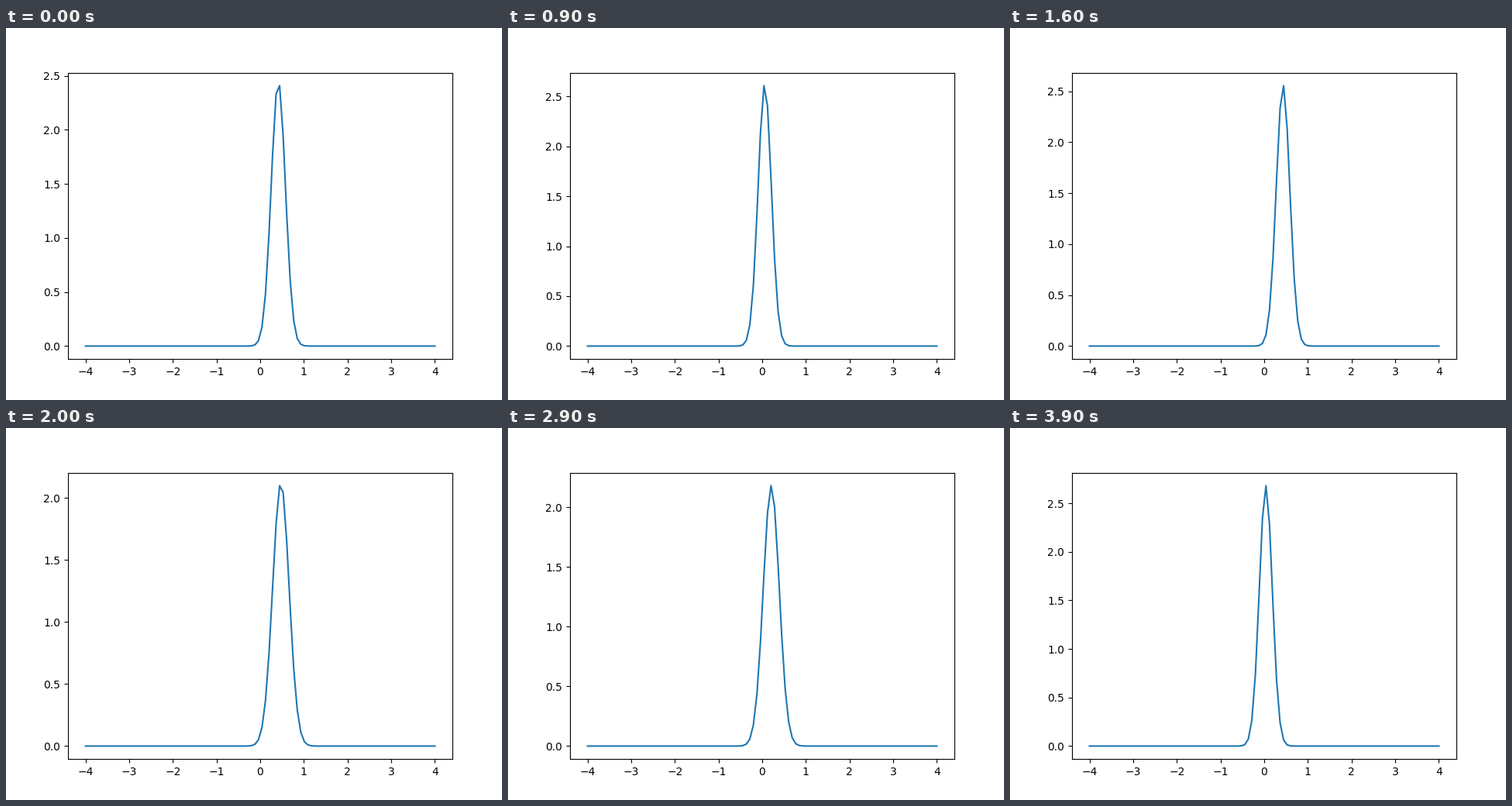
Animation of 640x480 px, one loop 4000 ms. Source, as a matplotlib script:

```python
import matplotlib.pyplot as plt
import numpy as np
from matplotlib.animation import FuncAnimation

FRAMES = 40
INTERVAL = 100  # ms
SWING = 0.25    # how far the mean drifts right between two key poses

# Key poses of the bell curve
steps = [0, 5, 9, 16, 25, 32, 39]
means = [0.4145, 0.1678, 0.0577, 0.431, 0.1106, 0.0082, 0.0369]
sigmas = [0.1628, 0.1555, 0.152, 0.1555, 0.2286, 0.1483, 0.1487]

x = np.linspace(-4, 4, 100)


def density(frame):
    phase = np.interp(frame, steps, range(len(steps)))
    fade = 1 - frame / (2 * FRAMES)
    mean = np.interp(frame, steps, means) + SWING * fade * abs(np.sin(np.pi * phase))
    sigma = np.interp(frame, steps, sigmas)
    z = (x - mean) / sigma
    return np.exp(-z**2 / 2) / (sigma * np.sqrt(2 * np.pi))


fig, ax = plt.subplots(figsize=(6.4, 4.8), dpi=100)
line, = ax.plot(x, density(0))


def update(frame):
    line.set_ydata(density(frame))
    ax.relim()
    ax.autoscale_view()
    return line,


anim = FuncAnimation(fig, update, frames=FRAMES, interval=INTERVAL,
                     repeat=True, repeat_delay=0, blit=False)
plt.show()
```
